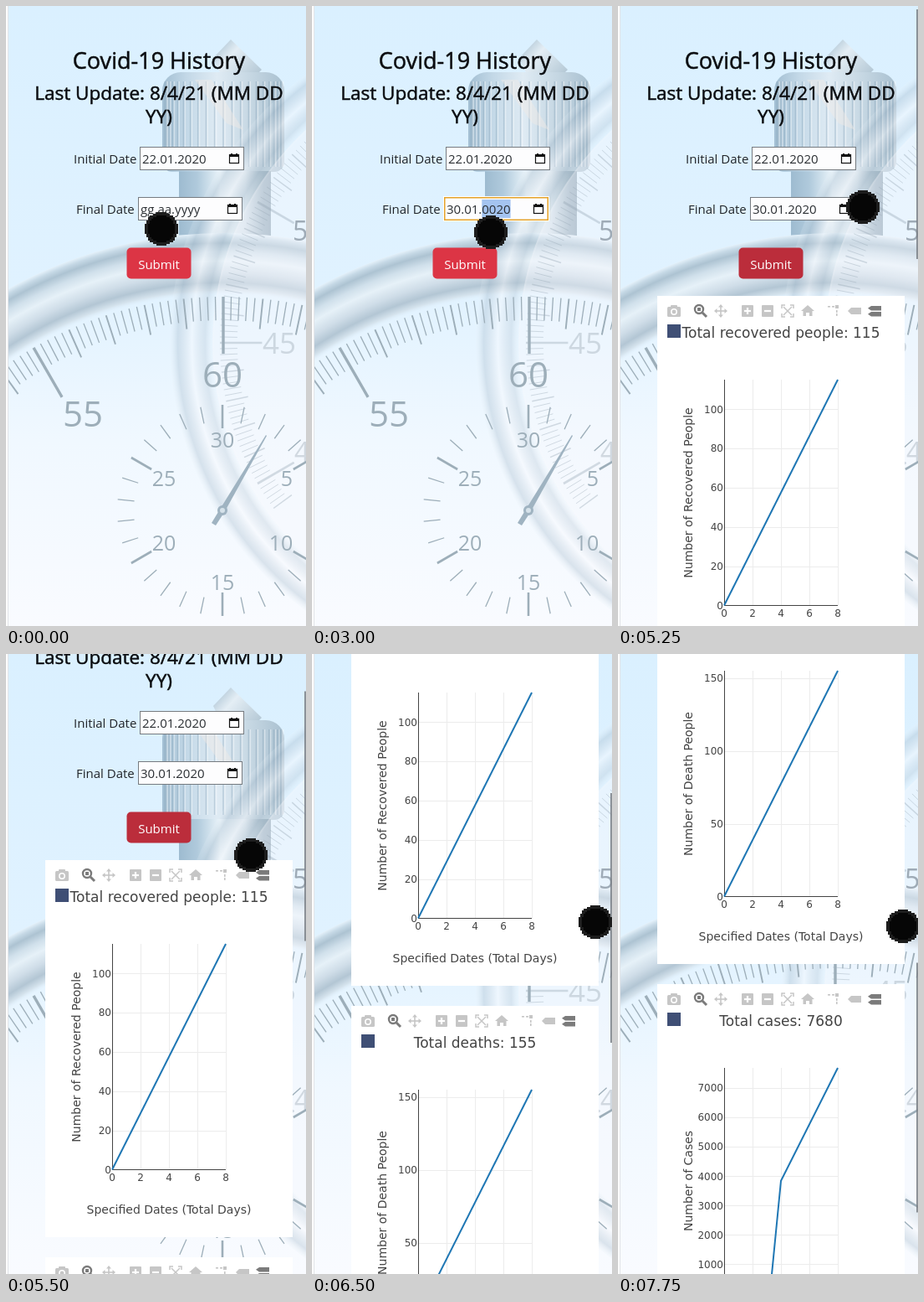
An HTML page with a canvas that plays this animation: 359 px wide and 740 px high, repeating every 8 s.

```html
<!DOCTYPE html>
<html lang="en">
<head>
<meta charset="utf-8">
<title>Covid-19 History</title>
<style>
html, body { margin: 0; width: 100%; height: 100%; overflow: hidden; background: #e6f4fe; }
canvas { display: block; }
</style>
</head>
<body>
<canvas id="stage" width="359" height="740"></canvas>
<script>
const W = 359, H = 740, LOOP = 8000;
const UI = '"Open Sans", "Noto Sans", sans-serif';
const PLOT = '"DejaVu Sans", sans-serif';
const ctx = document.getElementById('stage').getContext('2d');

// ---------- timeline (each row holds until the next) ----------
const pointer = [
  [0, 186, 266, 20], [250, 185, 264, 23], [500, 214, 270, 20], [4000, 217, 328, 22],
  [4250, 219, 321, 20], [4500, 217, 328, 23], [5000, 295, 243, 20], [5250, 293, 240, 20],
  [6250, 339, 320, 20], [7250, 341, 325, 20]
];
const finalDate = [
  [0, 'gg.aa.yyyy', 0, 0], [500, 'gg.aa.yyyy', 0, 2], [1500, '30.aa.yyyy', 3, 5],
  [2000, '30.00.yyyy', 3, 5], [2250, '30.01.yyyy', 6, 10], [2750, '30.01.0002', 6, 10],
  [3000, '30.01.0020', 6, 10], [3250, '30.01.2020', 6, 10], [4500, '30.01.2020', 0, 0]
];
const scrolls = [
  [0, 0], [5500, 100], [5750, 200], [6250, 300], [6500, 400],
  [6750, 412], [7000, 560], [7250, 700], [7500, 885], [7750, 900]
];
const FOCUS = 500, SUBMIT = 4500, THUMB = 5250;
const at = (rows, t) => rows.filter(r => r[0] <= t).pop();

// ---------- helpers ----------
function text(c, s, x, y, font, color, align = 'left') {
  c.font = font;
  c.fillStyle = color;
  c.textAlign = align;
  c.fillText(s, x, y);
}
function heading(s, y, size) {
  text(ctx, s, 183, y, `400 ${size}px ${UI}`, '#0b0d10', 'center');
  ctx.strokeStyle = '#0b0d10';
  ctx.lineWidth = 0.5;
  ctx.strokeText(s, 183, y);
}
function line(c, pts, color, width) {
  c.beginPath();
  pts.forEach(([x, y], i) => i ? c.lineTo(x, y) : c.moveTo(x, y));
  c.strokeStyle = color;
  c.lineWidth = width;
  c.stroke();
}
function poly(c, pts, fill) {
  c.beginPath();
  pts.forEach(([x, y]) => c.lineTo(x, y));
  c.closePath();
  c.fillStyle = fill;
  c.fill();
}
function blend(g, stops) {
  stops.forEach(([p, color]) => g.addColorStop(p, color));
  return g;
}
function box(x, y, w, h, r, fill) {
  ctx.beginPath();
  ctx.roundRect(x, y, w, h, r);
  ctx.fillStyle = fill;
  ctx.fill();
}

// ---------- stopwatch backdrop ----------
function ring(c, x, y, r0, r1, stops) {
  c.beginPath();
  c.arc(x, y, r1, 0, 7);
  c.arc(x, y, r0, 7, 0, true);
  c.fillStyle = blend(c.createRadialGradient(x, y, r0, x, y, r1), stops);
  c.fill();
}
function tick(c, x, y, deg, r0, r1, color, width) {
  const a = deg * Math.PI / 180, s = Math.sin(a), k = -Math.cos(a);
  line(c, [[x + r0 * s, y + r0 * k], [x + r1 * s, y + r1 * k]], color, width);
}
function scale(c, x, y, R, from, to, color, width) {
  for (let i = from; i <= to; i++) {
    const major = i % 25 === 0, second = i % 5 === 0;
    const len = R * (major ? 0.15 : second ? 0.08 : 0.062);
    tick(c, x, y, i * 1.2, R - len, R, color, major ? width * 2.6 : second ? width * 1.5 : width);
  }
}
function numeral(c, s, x, y, size, color, align = 'center') {
  text(c, s, x, y + size * 0.36, `${size}px ${UI}`, color, align);
}
function makeBackdrop() {
  const cv = document.createElement('canvas');
  cv.width = W;
  cv.height = H;
  const c = cv.getContext('2d');
  c.fillStyle = blend(c.createLinearGradient(0, 0, 0, H),
    [[0, '#daf0ff'], [0.45, '#e0f2ff'], [0.7, '#f0f8ff'], [1, '#f9fbff']]);
  c.fillRect(0, 0, W, H);

  // crown, neck
  poly(c, [[248, 62], [269, 40], [306, 76], [290, 92], [262, 92]],
    blend(c.createLinearGradient(250, 45, 300, 90), [[0, '#a9c1d1'], [0.35, '#e4eef5'], [1, '#b0c5d3']]));
  c.beginPath();
  c.roundRect(187, 79, 146, 119, [22, 22, 12, 12]);
  c.fillStyle = blend(c.createLinearGradient(187, 0, 333, 0),
    [[0, '#a3bfd3'], [0.2, '#c3d8e7'], [0.45, '#dfebf4'], [0.75, '#c3d5e1'], [1, '#a9c0d0']]);
  c.fill();
  for (let i = 0; i < 21; i++) {
    const x = 260 - 70 * Math.cos((i + 0.5) * Math.PI / 21);
    line(c, [[x, 90], [x, 192]], 'rgba(125,155,178,.36)', 1.5);
    line(c, [[x + 2, 90], [x + 2, 192]], 'rgba(255,255,255,.4)', 1.5);
  }
  poly(c, [[226, 88], [246, 88], [284, 148], [264, 140]], 'rgba(240,232,229,.45)');
  c.fillStyle = blend(c.createLinearGradient(207, 0, 317, 0),
    [[0, '#9dbbd0'], [0.2, '#b0cadc'], [0.45, '#eaf4fa'], [0.72, '#d3e1eb'], [0.92, '#9bb2c2'], [1, '#92aabb']]);
  c.fillRect(207, 197, 110, 82);

  // case
  ring(c, 260, 801, 456, 530, [
    [0, 'rgba(224,240,252,0)'], [0.08, '#d5e3ed'], [0.2, '#b3c6d4'], [0.36, '#cfdde8'],
    [0.55, '#e6f1f8'], [0.7, '#d0e0eb'], [0.84, '#adc3d2'], [0.93, '#c6d9e6'], [1, '#e4f1fa']]);

  // second, fainter watch
  const gx = 592, gy = 402;
  c.beginPath();
  c.arc(gx, gy, 345, 0, 7);
  c.fillStyle = 'rgba(248,248,252,.4)';
  c.fill();
  ring(c, gx, gy, 343, 396, [
    [0, 'rgba(255,255,255,.1)'], [0.2, 'rgba(176,192,206,.3)'], [0.5, 'rgba(250,250,253,.4)'],
    [0.82, 'rgba(160,182,200,.34)'], [1, 'rgba(235,243,249,.15)']]);
  scale(c, gx, gy, 336, 195, 268, 'rgba(145,162,175,.36)', 1);
  const faint = 'rgba(140,156,168,.34)';
  numeral(c, '45', 327, 402, 35, faint);
  numeral(c, '40', 345, 532, 32, faint, 'left');
  numeral(c, '50', 343, 268, 32, 'rgba(132,146,157,.75)', 'left');

  // main dial
  const ink = '#9daeb9';
  scale(c, 260, 801, 454, -30, 11, ink, 1.3);
  numeral(c, '60', 259, 440, 42, ink);
  numeral(c, '55', 92, 487, 42, ink);

  // small dial
  const sx = 259, sy = 602;
  for (let i = 0; i < 30; i++) {
    const major = i % 5 === 0;
    tick(c, sx, sy, i * 12, major ? 98 : 106, 126, ink, major ? 2.6 : 1.3);
  }
  [['30', 259, 518], ['25', 189, 564], ['20', 189, 641], ['15', 259, 688], ['10', 329, 641], ['5', 336, 564]]
    .forEach(([s, x, y]) => numeral(c, s, x, y, 25, ink));
  const steel = '#9fb3c1';
  poly(c, [[246, 617], [257, 599], [311, 512], [312, 513], [262, 603], [251, 620]], steel);
  c.beginPath();
  c.arc(sx, sy, 6, 0, 7);
  c.fillStyle = steel;
  c.fill();
  c.beginPath();
  c.arc(sx, sy, 3, 0, 7);
  c.fillStyle = '#d6e2ea';
  c.fill();
  return cv;
}
const backdrop = makeBackdrop();

// ---------- form ----------
function calendar(x, y) {
  ctx.strokeStyle = '#111';
  ctx.lineWidth = 1.2;
  ctx.strokeRect(x - 5.5, y - 4.5, 11, 10);
  ctx.fillStyle = '#111';
  ctx.fillRect(x - 6, y - 5, 12, 3);
  ctx.fillRect(x - 4, y - 6, 2, 1);
  ctx.fillRect(x + 2, y - 6, 2, 1);
}
function field(label, lx, x, y, value, from, to, focused) {
  const font = `15px ${UI}`;
  text(ctx, label, lx, y + 20, font, '#212529');
  ctx.fillStyle = '#fdfdfe';
  ctx.fillRect(x, y, 125, 28);
  ctx.lineWidth = 1;
  ctx.strokeStyle = '#767b80';
  ctx.strokeRect(x + 0.5, y + 0.5, 124, 27);
  if (focused) {
    ctx.strokeStyle = '#fff';
    ctx.strokeRect(x - 0.5, y - 0.5, 126, 29);
    ctx.strokeStyle = '#e5a32b';
    ctx.lineWidth = 1.5;
    ctx.strokeRect(x + 0.75, y + 0.75, 123.5, 26.5);
  }
  ctx.font = font;
  const width = n => ctx.measureText(value.slice(0, n)).width;
  if (to > from) {
    ctx.fillStyle = '#a4c4f0';
    ctx.fillRect(x + 3 + width(from), y + 3, width(to) - width(from), 22);
  }
  text(ctx, value, x + 3, y + 20, font, '#2b2f33');
  calendar(x + 113, y + 14);
}
function form(t) {
  heading('Covid-19 History', 75, 27);
  heading('Last Update: 8/4/21 (MM DD', 112, 22.5);
  heading('YY)', 140, 22.5);
  field('Initial Date', 81, 160, 168, '22.01.2020', 0, 0, false);
  const [, value, from, to] = at(finalDate, t);
  field('Final Date', 84, 158, 228, value, from, to, t >= FOCUS && t < SUBMIT);
  box(144.5, 288.5, 77, 37, 5, t < SUBMIT ? '#dc3545' : '#bb2d3b');
  text(ctx, 'Submit', 183, 314, `15px ${UI}`, '#fff', 'center');
}

// ---------- charts ----------
const charts = [
  { title: 'Total recovered people: 115', label: 'Number of Recovered People', max: 115, step: 20, data: [[0, 0], [8, 115]] },
  { title: 'Total deaths: 155', label: 'Number of Death People', max: 155, step: 50, data: [[0, 0], [8, 155]] },
  { title: 'Total cases: 7680', label: 'Number of Cases', max: 7680, step: 1000, data: [[0, 0], [3.22, 0], [4, 3840], [8, 7680]] }
];
function tag(x, y, w, h, color) {
  poly(ctx, [[x, y + h / 2], [x + 4, y], [x + w, y], [x + w, y + h], [x + 4, y + h]], color);
}
function toolbar(y) {
  const off = '#c6c6c6', on = '#7b7b7b';
  const circle = (x, cy, r, color, w) => {
    ctx.beginPath();
    ctx.arc(x, cy, r, 0, 7);
    ctx.strokeStyle = color;
    ctx.lineWidth = w;
    ctx.stroke();
  };
  // camera
  box(59, y - 5, 16, 12, 1.5, off);
  box(63, y - 7, 8, 4, 1, off);
  circle(67, y + 1, 3.2, '#fff', 1.5);
  // magnifier
  circle(97, y - 2, 5, on, 2.4);
  line(ctx, [[101, y + 2], [106, y + 7]], on, 3);
  ctx.fillStyle = on;
  ctx.fillRect(95, y - 4, 4, 4);
  // pan
  line(ctx, [[116, y], [130, y]], off, 1.6);
  line(ctx, [[123, y - 7], [123, y + 7]], off, 1.6);
  for (let i = 0; i < 4; i++) {
    ctx.save();
    ctx.translate(123, y);
    ctx.rotate(i * Math.PI / 2);
    poly(ctx, [[0, -8], [3, -4.5], [-3, -4.5]], off);
    ctx.restore();
  }
  // zoom in, zoom out
  [155, 179].forEach((x, i) => {
    box(x - 7, y - 7, 14, 14, 1, off);
    line(ctx, [[x - 4, y], [x + 4, y]], '#fff', 2.2);
    if (!i) line(ctx, [[x, y - 4], [x, y + 4]], '#fff', 2.2);
  });
  // autoscale
  for (const a of [-1, 1]) for (const b of [-1, 1]) {
    line(ctx, [[203 + a * 3, y + b * 7], [203 + a * 7, y + b * 7], [203 + a * 7, y + b * 3]], off, 1.5);
    line(ctx, [[203, y], [203 + a * 5, y + b * 5]], off, 1.5);
  }
  // home
  poly(ctx, [[219, y], [227, y - 7], [235, y], [232.5, y], [232.5, y + 6], [229, y + 6],
    [229, y + 2], [225, y + 2], [225, y + 6], [221.5, y + 6], [221.5, y]], off);
  // spikes
  ctx.fillStyle = off;
  [0, 5].forEach(d => ctx.fillRect(251 + d, y - 6, 3, 1.6));
  ctx.fillRect(260, y - 7, 4, 4);
  [-1, 3].forEach(d => ctx.fillRect(261, y + d, 1.6, 3));
  // hover tags
  tag(275, y - 4, 16, 8, off);
  tag(299, y - 6, 16, 5.5, on);
  tag(299, y + 1, 16, 5.5, on);
}
function chart({ title, label, max, step, data }, top) {
  const x0 = 127, x1 = 263, yTop = top + 100, y0 = top + 369.5;
  const px = v => x0 + v * 17, py = v => y0 - v / max * (y0 - yTop);
  const tickFont = `12px ${PLOT}`, labelFont = `14px ${PLOT}`;
  ctx.fillStyle = '#fff';
  ctx.fillRect(47, top, 296, 450);
  for (let v = 2; v <= 8; v += 2) line(ctx, [[px(v) + 0.5, yTop], [px(v) + 0.5, y0]], '#ececec', 1);
  for (let v = step; v <= max; v += step) {
    const y = Math.round(py(v)) + 0.5;
    line(ctx, [[x0, y], [x1, y]], '#ececec', 1);
  }
  line(ctx, [[x0 + 0.5, yTop], [x0 + 0.5, y0 + 0.5]], '#444', 1);
  line(ctx, [[x0, y0], [x1, y0]], '#444', 1);
  line(ctx, data.map(([a, b]) => [px(a), py(b)]), '#1f77b4', 2);
  for (let v = 0; v <= max; v += step) text(ctx, v, 126, py(v) + 4.4, tickFont, '#444', 'right');
  for (let v = 0; v <= 8; v += 2) text(ctx, v, px(v), top + 383, tickFont, '#444', 'center');
  text(ctx, 'Specified Dates (Total Days)', 195, top + 422, labelFont, '#444', 'center');
  ctx.save();
  ctx.translate(89, top + 235);
  ctx.rotate(-Math.PI / 2);
  text(ctx, label, 0, 0, labelFont, '#444', 'center');
  ctx.restore();
  toolbar(top + 18);
  ctx.fillStyle = '#3f4f75';
  ctx.fillRect(59, top + 34, 16, 16);
  text(ctx, title, 195, top + 50, `17px ${PLOT}`, '#444', 'center');
}

// ---------- pointer dot with stepped edge ----------
function disc(x, y, r, color) {
  ctx.fillStyle = color;
  for (let dy = -r; dy < r; dy += 2) {
    const half = 2 * Math.round(Math.sqrt(Math.max(0, r * r - (dy + 1) ** 2)) / 2);
    ctx.fillRect(x - half, y + dy, half * 2, 2);
  }
}

function draw(t) {
  const scroll = at(scrolls, t)[1];
  ctx.drawImage(backdrop, 0, 0);
  ctx.save();
  ctx.translate(0, -scroll);
  form(t);
  if (t >= SUBMIT) charts.forEach((c, i) => chart(c, 346 + i * 474));
  ctx.restore();
  ctx.fillStyle = '#fdfdfd';
  ctx.fillRect(0, 0, 2, H);
  ctx.fillStyle = '#e2e4e8';
  ctx.fillRect(2, 0, 1, H);
  if (t >= THUMB) {
    ctx.fillStyle = 'rgba(125,130,136,.85)';
    ctx.fillRect(357, 4 + scroll * 0.405, 2, 298);
  }
  const [, x, y, r] = at(pointer, t);
  disc(x, y, r, '#1d1d1d');
  disc(x, y, r - 4, '#060606');
}

function loop() {
  draw(performance.now() % LOOP);
  requestAnimationFrame(loop);
}
loop();
</script>
</body>
</html>
```
